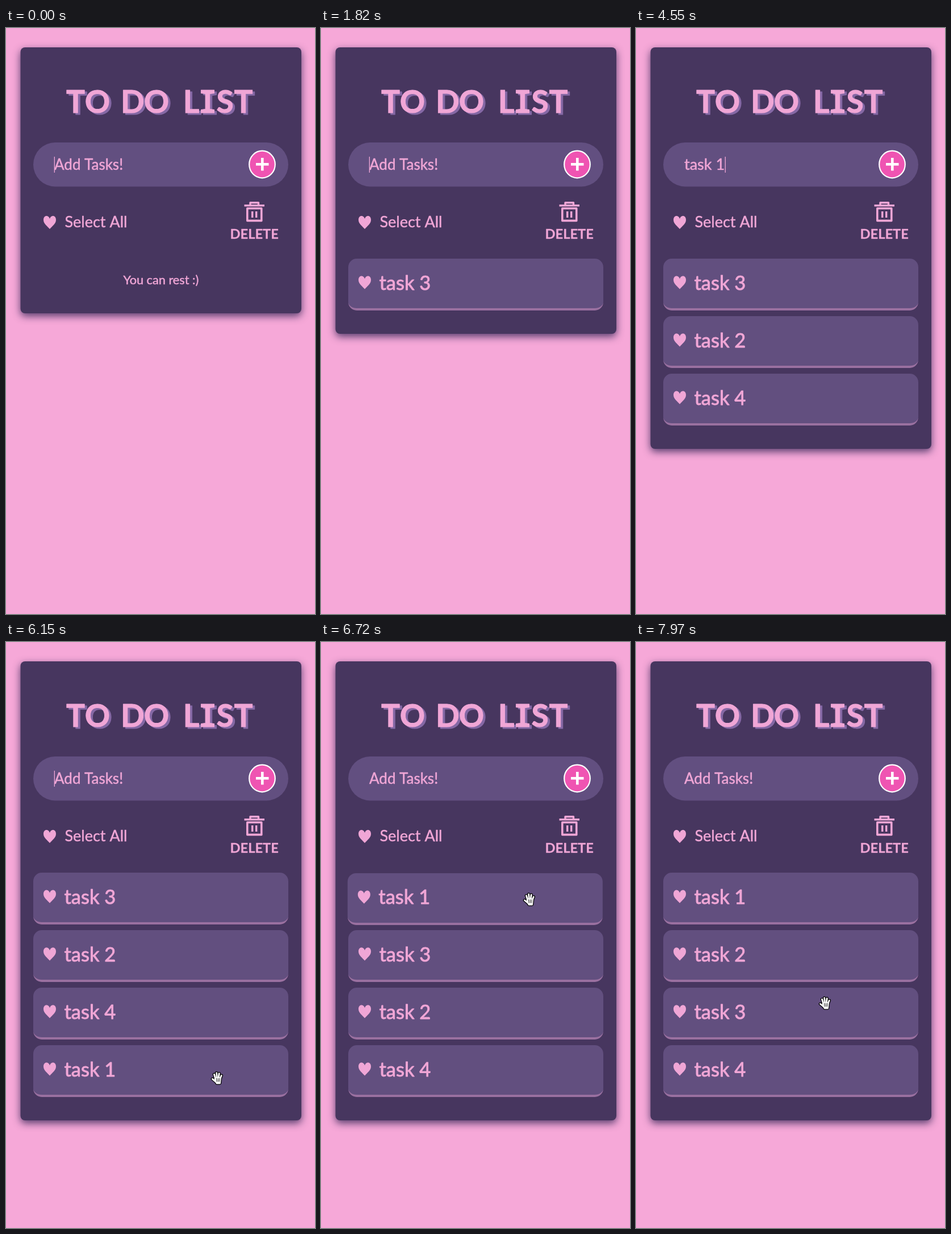
An HTML page with a canvas that plays this animation: 544 by 1029 pixels, repeating every 8000 ms.

```html
<!DOCTYPE html>
<html lang="en">
<head>
<meta charset="utf-8">
<title>To do list</title>
<style>
html, body { margin: 0; width: 100%; height: 100%; overflow: hidden; background: #f6a8d8; }
canvas { display: block; }
</style>
</head>
<body>
<canvas id="stage" width="544" height="1029"></canvas>
<script>
const ctx = document.getElementById('stage').getContext('2d');
const LOOP = 8000;
const PINK = '#f0a6d6', PANEL = '#47365f', FIELD = '#624f80';
const TOP = 405, PITCH = 101;

// Tasks in the order they are added, with the time of each addition.
const tasks = [
  { name: 'task 3', added: 1740 },
  { name: 'task 2', added: 2680 },
  { name: 'task 4', added: 3620 },
  { name: 'task 1', added: 4580 }
];
const TYPE_LEAD = 720, KEY_TIME = 100;

const GRAB_1 = 6215, DROP_1 = 6660, GRAB_2 = 7575, DROP_2 = 7820;
const pointerX = [[5300, 400], [5700, 372], [6215, 372], [6410, 368], [6500, 367], [6800, 367], [7350, 333]];
const pointerY = [[5300, 640], [5700, 772], [6150, 766], [6215, 751], [6410, 512], [6510, 452], [6800, 452], [7350, 551], [7580, 551], [7790, 634]];

const clamp = u => Math.max(0, Math.min(1, u));
const lerp = (a, b, u) => a + (b - a) * u;
const easeOut = (t, start, length) => 1 - (1 - clamp((t - start) / length)) ** 3;
const slot = i => TOP + PITCH * i;

function track(keys, t) {
  if (t <= keys[0][0]) return keys[0][1];
  for (let i = 1; i < keys.length; i++) {
    const [t0, v0] = keys[i - 1], [t1, v1] = keys[i];
    if (t < t1) return lerp(v0, v1, (t - t0) / (t1 - t0));
  }
  return keys[keys.length - 1][1];
}

function box(x, y, w, h, r, fill) {
  ctx.beginPath();
  ctx.roundRect(x, y, w, h, r);
  ctx.fillStyle = fill;
  ctx.fill();
}

function text(str, x, y, font, color = PINK, edge = 0.7) {
  ctx.font = font;
  ctx.fillStyle = ctx.strokeStyle = color;
  ctx.lineWidth = edge;
  ctx.lineJoin = 'round';
  ctx.fillText(str, x, y);
  ctx.strokeText(str, x, y);
}

const lato = (size, weight = 400) => `${weight} ${size}px Lato, sans-serif`;

function title() {
  const centers = [122.5, 161, 223, 265, 326, 355, 385.5, 418];
  ctx.textAlign = 'center';
  for (const [dx, dy, color] of [[4, 3, '#8568a5'], [0, 0, PINK]]) {
    [...'TODOLIST'].forEach((letter, i) => {
      const font = letter === 'I' ? '700 55px "Noto Sans Mono", monospace' : lato(55, 700);
      text(letter, centers[i] + dx, 148.5 + dy, font, color, 1);
    });
  }
  ctx.textAlign = 'left';
}

function heart(x, y) {
  ctx.beginPath();
  ctx.moveTo(x, y + 12);
  for (const s of [-1, 1]) {
    ctx.moveTo(x, y + 12);
    ctx.bezierCurveTo(x + s * 4, y + 7, x + s * 11, y + 3, x + s * 11, y - 4);
    ctx.bezierCurveTo(x + s * 11, y - 13, x + s * 2, y - 13, x, y - 6);
    ctx.closePath();
  }
  ctx.fillStyle = PINK;
  ctx.fill();
}

function panel(t) {
  const count = tasks.filter(k => t >= k.added).length;
  const bottom = count ? 436 + PITCH * count : 501;
  ctx.save();
  ctx.shadowColor = 'rgba(60,44,92,.85)';
  ctx.shadowBlur = 14;
  ctx.shadowOffsetY = 5;
  box(25.5, 34, 494.5, bottom - 34, 8, PANEL);
  ctx.restore();
  if (!count) text('You can rest :)', 206.5, 449.5, lato(21.7), PINK, 0.5);
}

function input(t) {
  box(48, 201, 449, 77.5, 39, FIELD);
  const current = tasks.find(k => t < k.added);
  const keys = current ? Math.floor((t - current.added + TYPE_LEAD) / KEY_TIME) + 1 : 0;
  const typed = current ? current.name.slice(0, Math.max(0, keys)) : '';
  text(typed || 'Add Tasks!', 85, 249, lato(typed ? 27 : 26), PINK, 0.5);
  const blink = (((t - 4890) % 1060) + 1060) % 1060 < 530;
  if (typed || blink) {
    const x = typed ? 85.5 + ctx.measureText(typed).width : 84.7;
    box(x, 226, 1.3, 28, 0, PINK);
  }
}

function addButton() {
  ctx.beginPath();
  ctx.ellipse(451, 239.5, 22.8, 23.8, 0, 0, 7);
  ctx.fillStyle = '#ef54b2';
  ctx.fill();
  ctx.strokeStyle = '#fff';
  ctx.lineWidth = 2.2;
  ctx.stroke();
  box(440, 237, 22.5, 4.6, 0, '#fff');
  box(449, 228, 4.6, 22.5, 0, '#fff');
}

function trash() {
  ctx.strokeStyle = PINK;
  ctx.lineJoin = 'round';
  ctx.lineWidth = 3.4;
  ctx.beginPath();
  ctx.moveTo(430, 311);
  ctx.lineTo(430, 306.7);
  ctx.lineTo(444.5, 306.7);
  ctx.lineTo(444.5, 311);
  ctx.stroke();
  box(419.5, 310, 35.5, 3.6, 0, PINK);
  ctx.lineWidth = 3.6;
  ctx.strokeRect(424.8, 316.8, 25, 21.6);
  box(432, 322, 3.4, 11, 0, PINK);
  box(439, 322, 3.4, 11, 0, PINK);
}

function card(name, x, y) {
  box(x, y, 449, 91, 15, 'rgba(197,168,241,.22)');
  const round = { x: 15, y: 15 }, flat = { x: 15, y: 11 };
  ctx.beginPath();
  ctx.roundRect(x, y, 449, 91, 15);
  ctx.roundRect(x, y, 449, 87, [round, round, flat, flat]);
  ctx.fillStyle = 'rgba(245,166,214,.38)';
  ctx.fill('evenodd');
  heart(x + 29, y + 41.5);
  text(name, x + 54.5, y + 54.5, lato(34.5), PINK, 0.9);
}

function cards(t, px, py) {
  const shift = (from, to, start) => lerp(slot(from), slot(to), easeOut(t, start, 250));
  const pos = {
    'task 3': { x: 48, y: shift(0, 1, 6430) },
    'task 2': { x: 48, y: shift(1, 2, 6301) },
    'task 4': { x: 48, y: shift(2, 3, 6290) },
    'task 1': { x: 48, y: slot(3) }
  };

  if (t >= GRAB_1) {
    const back = easeOut(t, DROP_1, 160);
    const held = Math.min(t, DROP_1);
    pos['task 1'] = {
      x: lerp(48 + track(pointerX, held) - 372, 48, back),
      y: lerp(slot(3) + track(pointerY, held) - 751, slot(0), back)
    };
  }
  if (t >= GRAB_2) {
    pos['task 3'].y = lerp(slot(1) + track(pointerY, Math.min(t, DROP_2)) - 551, slot(2), easeOut(t, DROP_2, 130));
    pos['task 2'].y = shift(2, 1, 7670);
  }

  const lifted = t >= GRAB_2 ? 'task 3' : 'task 1';
  const shown = tasks.filter(k => t >= k.added);
  shown.sort((a, b) => (a.name === lifted) - (b.name === lifted));
  for (const { name } of shown) card(name, pos[name].x, pos[name].y);
}

function hand(x, y, closed) {
  const tips = closed
    ? [[-5, -4], [-1.3, -5], [2.5, -4.7], [6, -3]]
    : [[-5.5, -6.5], [-1.3, -9], [3.2, -8], [7.3, -4.5]];
  const base = closed ? 5 : 7;
  const thumb = closed ? [-7, 1] : [-8.5, 1.5];
  ctx.save();
  ctx.translate(x, y);
  ctx.lineCap = ctx.lineJoin = 'round';
  for (const [color, width] of [['#000', 5.4], ['#fff', 2.9]]) {
    ctx.strokeStyle = ctx.fillStyle = color;
    ctx.lineWidth = width;
    ctx.beginPath();
    tips.forEach(([tx, ty], i) => {
      ctx.moveTo(tx, ty);
      ctx.lineTo(-2.5 + i * 2.2, 3);
    });
    ctx.moveTo(...thumb);
    ctx.lineTo(-2, base);
    ctx.stroke();
    ctx.beginPath();
    ctx.moveTo(-4, 1);
    ctx.lineTo(5.5, 0);
    ctx.lineTo(4.5, base + 2);
    ctx.lineTo(-1, base + 2);
    ctx.closePath();
    ctx.fill();
    ctx.stroke();
  }
  ctx.strokeStyle = '#222';
  ctx.lineWidth = 1;
  ctx.beginPath();
  for (let i = 0; i < 3; i++) {
    ctx.moveTo(-1.5 + i * 2.8, 0.5);
    ctx.lineTo(-1 + i * 2.4, 6);
  }
  ctx.stroke();
  ctx.restore();
}

function draw(t) {
  ctx.fillStyle = '#f6a8d8';
  ctx.fillRect(0, 0, 544, 1029);
  panel(t);
  title();
  input(t);
  addButton();
  heart(77, 341);
  text('Select All', 103.5, 350, lato(27), PINK, 0.5);
  trash();
  text('DELETE', 394.5, 370, lato(23.7, 700), PINK, 0.3);

  const px = track(pointerX, t), py = track(pointerY, t);
  cards(t, px, py);
  if (t >= pointerX[0][0]) {
    const closed = (t >= GRAB_1 && t < DROP_1) || (t >= GRAB_2 && t < DROP_2);
    hand(px, py, closed);
  }
}

const begin = performance.now();
function frame() {
  draw((performance.now() - begin) % LOOP);
  requestAnimationFrame(frame);
}
frame();
</script>
</body>
</html>
```
